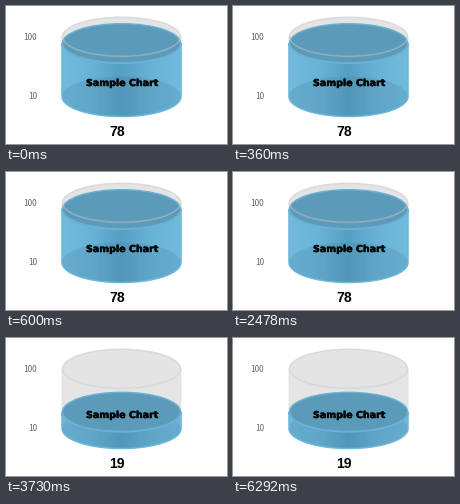
Animation of 221 by 138 pixels, one loop 8 s. Source, as a matplotlib script:

```python
import numpy as np
import matplotlib.pyplot as plt
from matplotlib.animation import FuncAnimation
from matplotlib.colors import LinearSegmentedColormap
from matplotlib.patches import Ellipse, Polygon
from matplotlib.patheffects import withStroke

W, H, DPI = 221, 138, 64
LOOP, STEP = 8000, 16
CX, RX, RY = 115.5, 59.5, 20
Y_LOW, Y_HIGH = 90.5, 30.8      # axis positions of 10 and 100
READINGS = [(0, 78), (3730, 19)]  # start in ms, value


def px(size):
    return size * 72 / DPI


def level(value):
    """Log axis: 10 at the bottom, 100 at the top."""
    return Y_LOW + (Y_HIGH - Y_LOW) * (np.log10(value) - 1)


def wall(top, bottom):
    """Front of the cylinder between two rim heights."""
    a = np.linspace(0, np.pi, 80)
    x, dy = CX + RX * np.cos(a), RY * np.sin(a)
    return np.vstack([np.c_[x, bottom + dy], np.c_[x, top + dy][::-1]])


def disc(y, inset=0, **style):
    return ax.add_patch(Ellipse((CX, y), 2 * (RX - inset), 2 * (RY - inset), **style))


fig = plt.figure(figsize=(W / DPI, H / DPI), dpi=DPI, facecolor="white")
ax = fig.add_axes([0, 0, 1, 1])
ax.axis("off")

# empty glass
ax.add_patch(Polygon(wall(Y_HIGH, Y_LOW), fc="#e5e5e5", ec="#e0e0e0", lw=px(0.8)))
disc(Y_HIGH, fc="#e4e4e4", ec="none", zorder=1.1)

# liquid: bright at the sides, deeper in the middle
blues = LinearSegmentedColormap.from_list(
    "liquid", ["#72bbdd", "#69b3d6", "#559fc2", "#69b3d6", "#72bbdd"])
fill = ax.imshow(np.linspace(0, 1, 240)[None, :], cmap=blues, aspect="auto",
                 extent=(CX - RX, CX + RX, H, 0), zorder=2)
base = disc(Y_LOW, fc=(0.25, 0.48, 0.6, 0.22), ec="none", zorder=2.1)
body = ax.add_patch(Polygon(wall(50, Y_LOW), fc="none", ec="#6cb7db",
                            lw=px(1.5), zorder=2.2))
surface = disc(50, 0.5, fc="#5b9ab8", ec="#69b0d2", lw=px(1.5), zorder=2.3)

# glass rim
disc(Y_HIGH, 0.5, fc="none", ec=(0.8, 0.8, 0.8, 0.42), lw=px(1.7), zorder=3)

for value in (10, 100):
    ax.text(31.3, level(value) - 0.8, str(value), family="Noto Sans CJK JP",
            size=px(8.3), color="#666666", ha="right", va="center_baseline")
ax.text(116, 80, "Sample Chart", family="DejaVu Sans", weight="bold",
        size=px(9.5), color="black", ha="center", va="baseline", zorder=4,
        path_effects=[withStroke(linewidth=px(0.4), foreground="black")])
number = ax.text(111, 130, "", family="Liberation Sans", weight="bold",
                 size=px(14), color="black", ha="center", va="baseline")
ax.set_xlim(0, W)
ax.set_ylim(H, 0)


def draw(i):
    now = i * STEP
    value = [v for start, v in READINGS if now + STEP / 2 >= start][-1]
    y = level(value)
    body.set_xy(wall(y, Y_LOW))
    fill.set_clip_path(body)
    base.set_clip_path(body)
    surface.center = CX, y
    number.set_text(str(value))
    return body, fill, base, surface, number


anim = FuncAnimation(fig, draw, frames=LOOP // STEP, interval=STEP,
                     repeat=True, repeat_delay=0)
plt.show()
```
